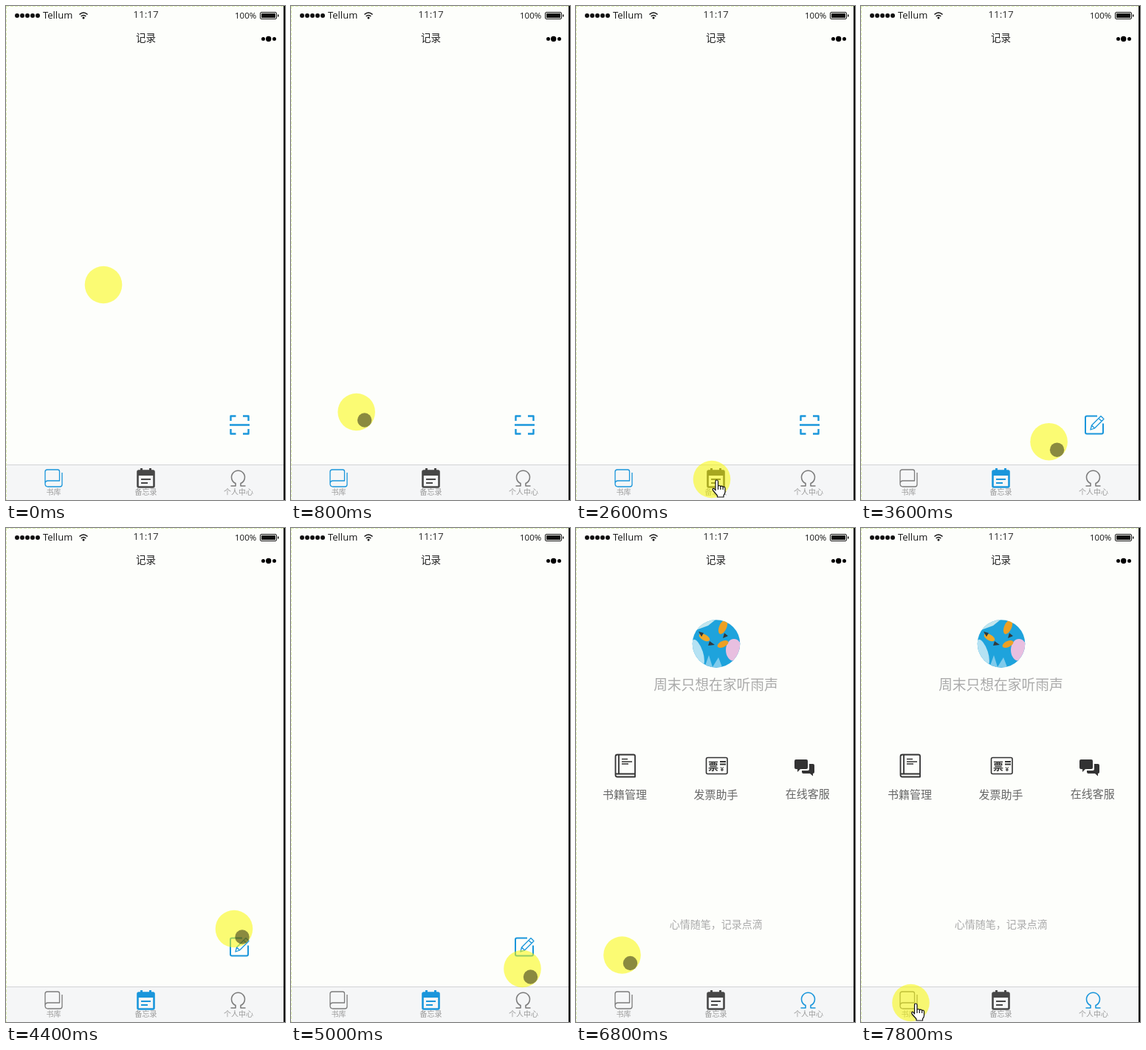
These frames come from a looping animation (378x668 px, 8000 ms). An HTML page:

```html
<!DOCTYPE html>
<html lang="zh-CN">
<head>
<meta charset="utf-8">
<style>
html, body { margin: 0; width: 100%; height: 100%; overflow: hidden; background: #fdfefb; }
svg { display: block; width: 378px; height: 668px; font-family: "Noto Sans CJK SC", "Noto Sans CJK", sans-serif; }
.latin { font-family: "Open Sans", "Noto Sans", sans-serif; }
.mid { text-anchor: middle; }
.line { fill: none; stroke: currentColor; stroke-width: 1.3; stroke-linejoin: round; }
.tab { color: #7c7c7c; }
.tab.dark { color: #474747; }
.tab.on { color: #1a96db; }
.tab text { font-size: 10px; fill: #999; }
.action { color: #1a96db; }
.label { font-size: 15px; fill: #666; }
.soft { fill: #aaa; }
.menu { color: #333; }
</style>
</head>
<body>
<svg viewBox="0 0 378 668">
  <rect width="378" height="668" fill="#fdfefb"/>
  <path d="M0 .5H376M.5 0V668" stroke="#dff0b4" stroke-dasharray="4 2"/>

  <!-- status bar and title -->
  <path d="M15 13h28.1" stroke="#111" stroke-width="6" stroke-linecap="round" stroke-dasharray="0 7"/>
  <g class="latin" fill="#111">
    <text x="50" y="16.5" font-size="13">Tellum</text>
    <text x="189.5" y="16" font-size="13.5" class="mid" fill="#333">11:17</text>
    <text x="310" y="17" font-size="11.5">100%</text>
  </g>
  <g fill="none" stroke="#111" stroke-width="1.6">
    <path d="M99.5 11.5Q105 6.5 110.5 11.5M101.7 14Q105 11 108.300 14"/>
    <circle cx="105" cy="16" r=".7"/>
  </g>
  <rect x="344.5" y="8.5" width="22" height="9" rx="1.5" fill="none" stroke="#111"/>
  <path d="M346 10h19v6h-19zM368 11.5h1.500v3h-1.500z" fill="#111"/>
  <text x="189.5" y="48" font-size="13.5" class="mid" fill="#222">记录</text>
  <circle cx="348.5" cy="44.5" r="2.5"/>
  <circle cx="355.7" cy="44.5" r="3.7"/>
  <circle cx="363.5" cy="44.5" r="2.5"/>

  <!-- floating buttons -->
  <g id="scan" class="action">
    <path class="line" style="stroke-width:2.4" d="M304.5 561v-6.500h7M321 554.500h7.500v6.500M304.500 572v6.500h7M321 578.500h7.500v-6.500M303 566.500h27"/>
  </g>
  <g id="edit" class="action">
    <path class="line" style="stroke-width:2" d="M320 554.500h-14q-2 0-2 2v20q0 2 2 2h20q2 0 2-2v-12"/>
    <path class="line" d="M311 573l1.500-6 12.500-12.500 4 4-12.500 12.500zM322 557.500l4 4M312.500 567l4 4"/>
  </g>

  <!-- personal page -->
  <g id="profile">
    <clipPath id="round"><circle cx="190" cy="156.5" r="32.3"/></clipPath>
    <g clip-path="url(#round)">
      <path d="M157 124h66v66h-66z" fill="#1ea3dc"/>
      <path d="M157 124h32l-10 8-22 8z" fill="#c3e6ee"/>
      <ellipse cx="214" cy="165" rx="11" ry="15" fill="#e8bfe0"/>
      <ellipse cx="165" cy="169" rx="7" ry="19" fill="#b5e2f3" transform="rotate(-18 165 169)"/>
      <ellipse cx="199" cy="134" rx="5" ry="10" fill="#eda024" transform="rotate(24 199 134)"/>
      <ellipse cx="174" cy="148" rx="8" ry="4" fill="#f0a828" transform="rotate(28 174 148)"/>
      <ellipse cx="199" cy="157" rx="8" ry="4" fill="#eda024" transform="rotate(-24 199 157)"/>
      <path d="M166 140l7 2-3 5zM201 142l5 4-7 3zM181 153l7 5-9 1z" fill="#333a3c"/>
      <path d="M174 189l6-17 5 16 8-13 5 13z" fill="#7fcbec"/>
    </g>
    <text x="189.5" y="219" font-size="18.75" class="mid soft">周末只想在家听雨声</text>
    <g class="menu">
      <path class="line" style="stroke-width:1.8" d="M56 306.500h22q2 0 2 2v28H56q-2.500 0-2.500-2.500v-25q0-2.500 2.500-2.500zM58 307v25M54 332.500h26"/>
      <path class="line" d="M62 312.500h8M62 316h14M62 319h9"/>
      <rect class="line" x="176.5" y="310.5" width="28.5" height="22" rx="2" style="stroke-width:1.6"/>
      <text x="179" y="326.5" font-size="14" font-weight="700" fill="currentColor">票</text>
      <path class="line" style="stroke-width:1.8" d="M195 316h8M195 319.500h8"/>
      <text x="195.5" y="329" font-size="8" font-weight="700" fill="currentColor">¥</text>
      <path fill="currentColor" d="M298 313h14q2 0 2 2v9q0 2-2 2h-8l-4 4v-4h-2q-2 0-2-2v-9q0-2 2-2zM316 319h5q2 0 2 2v9q0 2-2 2v3.500l-4-3.500h-9q-2 0-2-2v-2h8q2 0 2-2z"/>
    </g>
    <g class="label mid">
      <text x="66" y="366">书籍管理</text>
      <text x="189.5" y="366">发票助手</text>
      <text x="313.7" y="365">在线客服</text>
    </g>
    <text x="189.8" y="541" font-size="14" class="mid soft">心情随笔，记录点滴</text>
  </g>

  <!-- tab bar -->
  <path d="M1 620h376v48H1z" fill="#f5f6f7"/>
  <path d="M1 620.500h376" stroke="#d2d2d6"/>
  <g class="tab mid">
    <path class="line" d="M53 646V630q0-3 3-3h14q2.500 0 2.500 2.500v12.500H57q-4 0-4 4t4 4h16q3 0 3-3v-16"/>
    <text x="64.5" y="661">书库</text>
  </g>
  <g class="tab dark mid">
    <rect class="line" x="178.5" y="628.5" width="22" height="22" rx="1.5" style="stroke-width:2.6"/>
    <path fill="currentColor" d="M178 628h23v7h-23zM182 625h3v4h-3zM194 625h3v4h-3z"/>
    <path class="line" style="stroke-width:2.2" d="M183 640h13M183 645h9"/>
    <text x="189.5" y="661">备忘录</text>
  </g>
  <g class="tab mid">
    <path class="line" style="stroke-width:1.6" d="M304.500 649h6.500v-3.500a9 9 0 1 1 7 0v3.500h6.500"/>
    <text x="315" y="661">个人中心</text>
  </g>

  <path d="M376 0h2v668h-2z" fill="#111"/>

  <g id="pointer">
    <circle r="25.3" fill="#fafa00" opacity=".54"/>
    <circle id="dot" cx="11" cy="11" r="9.7" opacity=".45"/>
    <path id="hand" fill="#fff" stroke="#111" stroke-width="1.2" stroke-linejoin="round"
      d="M5 15V3q0-2 1.700-2T8.500 3v7q0-1.500 1.600-1.500t1.700 1.700q.2-1 1.600-1t1.700 1.700q.3-.8 1.400-.8 1.500 0 1.500 2v5q0 2.500-2 4.500v2.400H7.500V22L1.500 15q-1-1.600.2-2.400T5 15zM8.500 10v4M11.800 10.500v3.500M15.100 11v3"/>
  </g>
</svg>
<script>
const LOOP = 8000, STEP = 200;
// pointer path: time, x, y
const path = [
  [0, 132, 377], [1200, 67, 635], [1400, 66, 641], [1600, 70, 642],
  [2200, 156, 643], [2400, 156, 643], [2600, 184, 640], [3000, 188, 636],
  [4000, 299, 558], [4400, 309, 542], [4800, 309, 552], [5200, 318, 640],
  [5600, 318, 648], [6000, 318, 646], [6400, 225, 562], [6800, 62.5, 577.5],
  [7200, 62.5, 577.5], [7800, 67.5, 642]
];
const $ = id => document.getElementById(id);
const tabs = document.querySelectorAll('.tab');
const show = (id, on) => $(id).style.display = on ? '' : 'none';

function pointerAt(t) {
  const i = path.findIndex(key => key[0] >= t);
  if (i < 1) return path[0].slice(1);
  const [t0, x0, y0] = path[i - 1], [t1, x1, y1] = path[i];
  const k = (t - t0) / (t1 - t0);
  return [x0 + (x1 - x0) * k, y0 + (y1 - y0) * k];
}

function draw(now) {
  const t = Math.floor(now % LOOP / STEP) * STEP;
  const selected = t < 3000 ? 0 : t < 5400 ? 1 : 2;
  const [x, y] = pointerAt(t);
  const onTabs = y > 620;
  tabs.forEach((tab, i) => tab.classList.toggle('on', i === selected));
  show('scan', selected === 0);
  show('edit', selected === 1);
  show('profile', selected === 2);
  show('hand', onTabs);
  show('dot', !onTabs && t > 0);
  $('pointer').setAttribute('transform', `translate(${x} ${y})`);
}

const start = performance.now();
function tick() {
  draw(performance.now() - start);
  requestAnimationFrame(tick);
}
tick();
</script>
</body>
</html>
```
